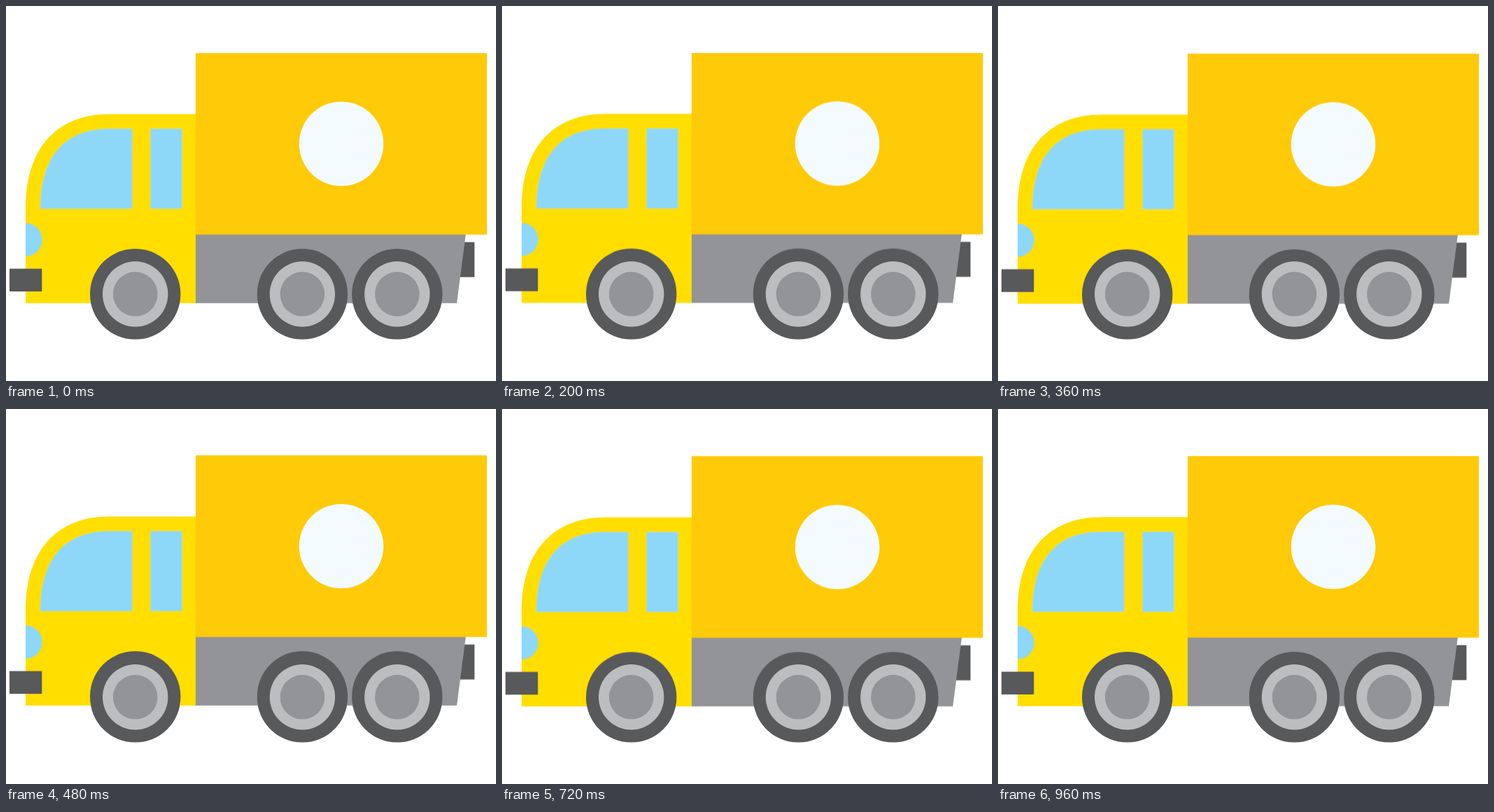
These frames come from a looping animation (700 px wide and 536 px high, 1000 ms). An HTML page:

```html
<!DOCTYPE html>
<html lang="en">
<head>
<meta charset="utf-8">
<title>Truck</title>
<style>
  html, body { margin: 0; width: 100%; height: 100%; overflow: hidden; background: #fff; }
  svg { display: block; width: 700px; height: 536px; }
  .cab { fill: #ffde00; }
  .box { fill: #ffca08; }
  .chassis { fill: #939498; }
  .dark { fill: #58595b; }
  .rim { fill: #bbbdbf; }
  .glass { fill: #8dd8f8; }
  .pane { stroke: #c3dcc4; stroke-width: .8; }
  .badge { fill: #f3fbff; }
  .body { animation: rattle 1s ease-in-out infinite; }
  @keyframes rattle {
    0%, 96%, 100% { transform: translateY(0); }
    20% { transform: translateY(-.4px); }
    28% { transform: translateY(2.4px); }
    36% { transform: translateY(.75px); }
    48% { transform: translateY(-.9px); }
    64% { transform: translateY(1.25px); }
    80% { transform: translateY(-.65px); }
  }
</style>
</head>
<body>
<svg viewBox="0 0 700 536">
  <defs>
    <circle id="tyre" class="dark" cy="411.9" r="64.7"/>
    <path id="arch" class="dark" d="M-63.1 426A64.7 64.7 0 1 1 63.1 426Z"/>
    <g id="hub">
      <circle class="rim" cy="411.8" r="46.7"/>
      <circle class="chassis" cy="411.8" r="31.8"/>
    </g>
  </defs>

  <use href="#tyre" x="184.7"/>
  <use href="#tyre" x="423.4"/>
  <use href="#tyre" x="558.8"/>

  <g class="body">
    <path class="dark" d="M645 337.5H669.3V387.5H645Z"/>
    <path class="chassis" d="M270 325H657L644 424.8H270Z"/>
    <path class="cab" d="M28 424.8V288C28 204 72 154.5 148 154.5H271V424.8Z"/>
    <path class="box" d="M271 67.2H687V326.7H271Z"/>
    <path class="glass pane" d="M49 289.8C49 217 82 175.6 147 175.6H180.3V289.8Z"/>
    <path class="glass pane" d="M206.4 175.6H251.4V289.8H206.4Z"/>
    <path class="glass" d="M28 310.3A23.7 23.7 0 0 1 28 357.7Z"/>
    <path class="dark" d="M5 375.5H51.3V407.9H5Z"/>
    <circle class="badge" cx="479" cy="197" r="60.3"/>
    <use href="#arch" x="184.7"/>
    <use href="#arch" x="423.4"/>
    <use href="#arch" x="558.8"/>
  </g>

  <use href="#hub" x="184.7"/>
  <use href="#hub" x="423.4"/>
  <use href="#hub" x="558.8"/>
</svg>
</body>
</html>
```
